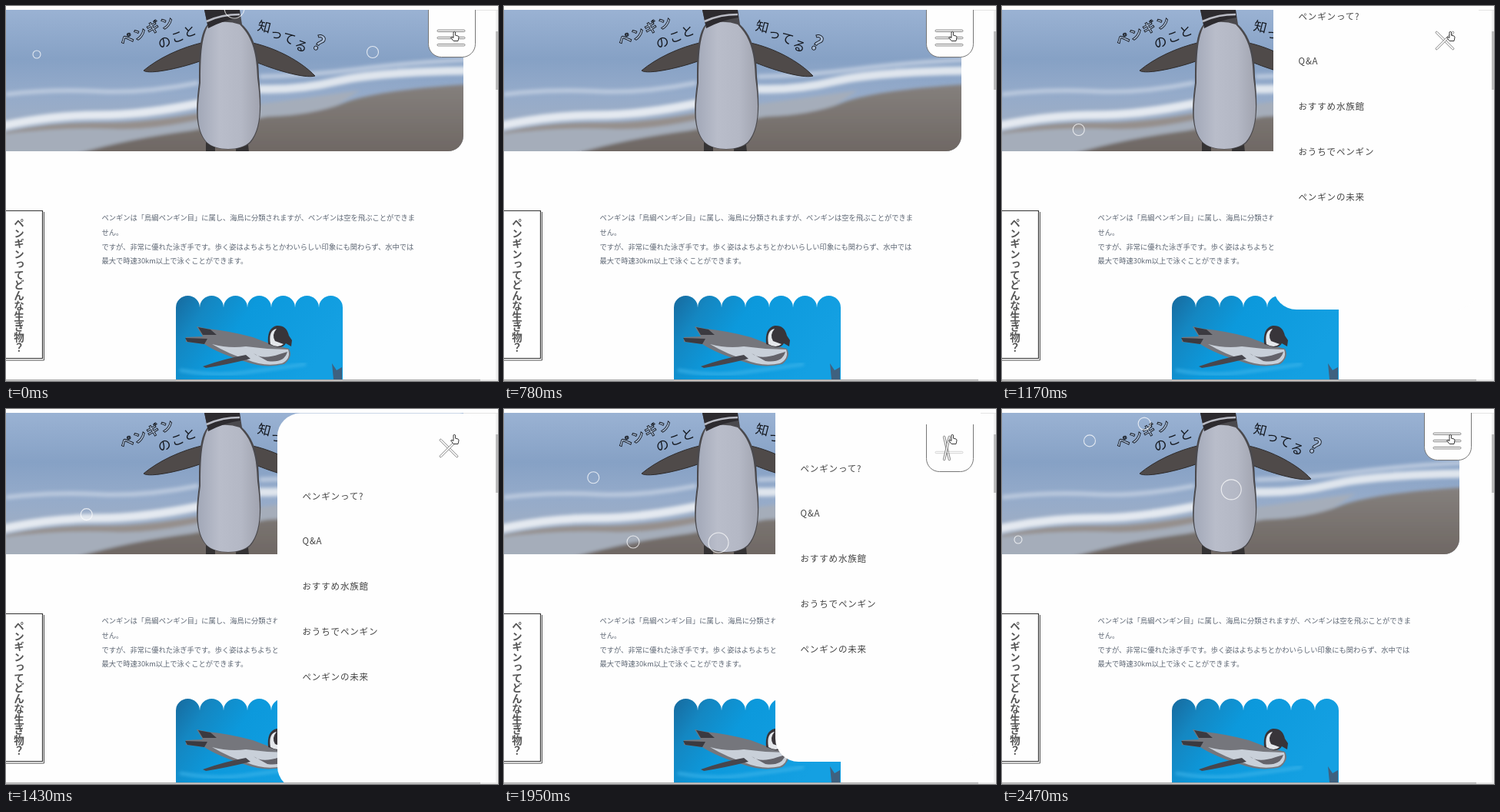
An HTML page for the animation above (2.6 s loop, 640 by 488 pixels).

```html
<!DOCTYPE html>
<html lang="ja">
<head>
<meta charset="utf-8">
<title>ペンギン</title>
<style>
  html, body { margin: 0; width: 100%; height: 100%; overflow: hidden; background: #fefefe; }
  svg { display: block; width: 640px; height: 488px; font-family: "Noto Sans CJK JP", "Noto Sans CJK", "Noto Sans", sans-serif; }
  .title { font-size: 17px; text-anchor: middle; fill: #14181f; }
  .outlined { font-weight: 700; fill: #a9bdd8; stroke: #14181f; stroke-width: .9; }
  .body { font-size: 9.27px; font-weight: 300; fill: #5d6673; }
  .side { font-size: 13.5px; font-weight: 700; fill: #555; writing-mode: vertical-rl; }
  .menu { font-size: 11.5px; font-weight: 300; letter-spacing: .85px; fill: #444; }
  .bar { fill: #fff; stroke: #777; stroke-width: .9; }
  .bubble { fill: none; stroke: #fff; stroke-width: 1.1; opacity: .75; }
</style>
</head>
<body>
<svg id="stage" viewBox="0 0 640 488">
  <defs>
    <clipPath id="heroClip"><path d="M0 5H595V169A20 20 0 0 1 575 189H0Z"/></clipPath>
    <clipPath id="poolClip"><path id="scallops"/></clipPath>
    <clipPath id="pageClip"><rect y="5" width="637" height="481"/></clipPath>
    <linearGradient id="sea" x2="0" y2="1">
      <stop offset="0" stop-color="#9ab2d3"/>
      <stop offset=".35" stop-color="#86a1c5"/>
      <stop offset=".6" stop-color="#95abca"/>
      <stop offset="1" stop-color="#a5b0c0"/>
    </linearGradient>
    <linearGradient id="beach" x2="0" y2="1">
      <stop offset="0" stop-color="#85807d"/>
      <stop offset="1" stop-color="#6e6763"/>
    </linearGradient>
    <linearGradient id="belly" x2="1" y2="0">
      <stop offset="0" stop-color="#a2a8b8"/>
      <stop offset=".35" stop-color="#b9bdca"/>
      <stop offset=".7" stop-color="#b4b8c5"/>
      <stop offset="1" stop-color="#a1a4b0"/>
    </linearGradient>
    <linearGradient id="pool" x2="1" y2=".35">
      <stop offset="0" stop-color="#176a9e"/>
      <stop offset=".2" stop-color="#1487c2"/>
      <stop offset=".45" stop-color="#0c99dc"/>
      <stop offset="1" stop-color="#14a0e2"/>
    </linearGradient>
    <filter id="soft"><feGaussianBlur stdDeviation="2"/></filter>
  </defs>

  <rect width="640" height="488" fill="#fefefe"/>
  <path d="M0 5.5H640" stroke="#e4e4e4"/>

  <g clip-path="url(#heroClip)">
    <rect y="5" width="595" height="184" fill="url(#sea)"/>
    <g filter="url(#soft)">
      <path d="M0 115Q60 108 120 111T250 100M330 92Q400 90 460 82T600 70" stroke="#b9c8dd" stroke-width="6" fill="none"/>
      <path d="M0 164Q60 151 120 152T260 138V192H0Z" fill="#958f8c"/>
      <path d="M-5 167Q70 157 140 160T330 128L460 110 420 136 250 160 120 192H-5Z" fill="#a5adba"/>
      <path d="M-5 156Q60 142 120 142T255 126" stroke="#e4e9f0" stroke-width="11" fill="none"/>
      <path d="M328 108Q380 110 430 98T600 84" stroke="#dfe5ed" stroke-width="11" fill="none"/>
      <path d="M90 193Q160 172 250 161L340 144Q400 142 440 126T600 102V193Z" fill="url(#beach)"/>
    </g>
    <path d="M260 170H272V190H260ZM300 170H314L316 190H299Z" fill="#353334"/>
    <path d="M258 47C227 54 198 68 179 84C186 90 232 80 257 70Z" fill="#4f4a49" stroke="#2d2b2c"/>
    <path d="M321 48C352 55 384 72 402 91C388 95 346 82 323 72Z" fill="#4f4a49" stroke="#2d2b2c"/>
    <path d="M258 5H304L307 24C324 40 329 64 329 92C333 130 333 160 318 178C306 189 273 190 260 177C245 160 247 130 251 100C251 65 251 38 262 24Z" fill="#4a494d"/>
    <path d="M263 25Q284 17 304 24C322 42 326 64 327 94C332 130 332 160 317 177C305 189 273 189 261 177C246 160 249 130 253 100C253 66 254 42 263 25Z" fill="url(#belly)"/>
    <path d="M258 5H304L305 15Q284 18 263 29Z" fill="#2d2b2f"/>
    <path d="M261 20Q280 11 304 11" stroke="#b9bbc4" stroke-width="2.5" fill="none"/>
    <g id="heading"></g>
    <g id="bubbles"></g>
  </g>

  <path d="M49.5 268V461H0" fill="none" stroke="#555"/>
  <path d="M0 266.5H47.5V458.5H0" fill="#fefefe" stroke="#333" stroke-width="1.2"/>
  <text class="side" x="17" y="275.5">ペンギンってどんな生き物？</text>
  <g id="intro" class="body"></g>

  <g clip-path="url(#poolClip)">
    <rect x="221" y="377" width="217" height="109" fill="url(#pool)"/>
    <path d="M226 474Q270 482 310 477T390 466" filter="url(#soft)" fill="none" stroke="#3fb5ea" stroke-width="3"/>
    <path d="M248 417L262 420Q292 423 321 431L342 439L368 446Q374 456 362 466Q336 472 312 463Q276 452 258 440L234 437V431L256 430Z" fill="#75767c"/>
    <path d="M250 418L266 421L274 428L256 428ZM233 432L262 433L258 440L236 437Z" fill="#3b3a40"/>
    <path d="M268 440Q290 446 312 443L340 446L367 447Q371 459 359 465Q336 470 313 460Q290 453 268 440Z" fill="#c9d0d9"/>
    <path d="M256 469Q284 459 312 454L318 459Q286 467 260 471Z" fill="#47464d"/>
    <path d="M322 452Q333 461 356 453L366 450Q362 465 340 462Z" fill="#64636a"/>
    <path d="M341 440Q339 419 352 416Q365 415 368 429L372 435L371 443L364 439Q360 446 350 443Z" fill="#38353a"/>
    <path d="M344 440Q341 422 352 420Q345 428 350 436L361 440Q354 446 344 440Z" fill="#e4e7eb"/>
    <path d="M424 465L430 474 437 470V486H426Z" fill="#3f617f"/>
  </g>

  <g clip-path="url(#pageClip)">
    <g id="panel">
      <rect x="353" y="5.6" width="267" height="489.4" rx="30" fill="#fefefe"/>
      <g id="links" class="menu"></g>
    </g>
    <g id="button">
      <path id="box" d="M549.5 5V49.5A17 17 0 0 0 566.5 66.5H593.5A17 17 0 0 0 610.5 49.5V5" fill="#fefefe" stroke="#777"/>
      <rect class="bar" x="-18" y="-1.2" width="36" height="2.4" rx="1.2"/>
      <rect class="bar" x="-18" y="-1.2" width="36" height="2.4" rx="1.2"/>
      <rect class="bar" x="-18" y="-1.2" width="36" height="2.4" rx="1.2"/>
    </g>
  </g>

  <path d="M582 34Q583.4 32.6 584.6 34V38.2L588 39Q589 39.4 589 41L588 45.5H582.2L578.6 41Q579.4 39.4 582 41.4Z" fill="#fff" stroke="#222" stroke-width=".9"/>
  <rect x="637" y="6" width="3" height="480" fill="#f0f0f0"/>
  <rect x="637" y="33" width="3" height="76" fill="#bcbcbc"/>
  <rect y="486" width="640" height="2" fill="#e6e6e6"/>
  <rect y="486" width="617" height="1.4" fill="#a6a6a6"/>
</svg>
<script>
const STEP = 130, LOOP = 2600;
const $ = id => document.getElementById(id);

function add(parent, tag, attrs, text = "") {
  const el = document.createElementNS("http://www.w3.org/2000/svg", tag);
  for (const k in attrs) el.setAttribute(k, attrs[k]);
  el.textContent = text;
  return parent.appendChild(el);
}

// Scalloped top edge of the pool picture
$("scallops").setAttribute("d", "M221 392.5" + "a15.5 15.5 0 0 1 31 0".repeat(7) + "V486H221Z");

// Curved heading: text, centre x, centre y, turn, outlined, font size
[
  ["ペ", 157, 43, -24, 1], ["ン", 174, 36, -22, 1], ["ギ", 191, 28, -20, 1], ["ン", 209, 22, -20, 1],
  ["の", 206, 47, -24], ["こ", 223, 40, -20], ["と", 239, 33, -18],
  ["知", 336, 27, 14], ["っ", 352, 36, 18], ["て", 368, 42, 20], ["る", 384, 52, 22], ["?", 407, 48, 28, 1, 27]
].forEach(([ch, x, y, turn, outlined, size = 17]) => add($("heading"), "text", {
  class: outlined ? "title outlined" : "title",
  y: size * .365,
  transform: `translate(${x} ${y}) rotate(${turn})`,
  style: `font-size:${size}px`
}, ch));

[
  "ペンギンは「鳥綱ペンギン目」に属し、海鳥に分類されますが、ペンギンは空を飛ぶことができま",
  "せん。",
  "ですが、非常に優れた泳ぎ手です。歩く姿はよちよちとかわいらしい印象にも関わらず、水中では",
  "最大で時速30km以上で泳ぐことができます。"
].forEach((line, i) => add($("intro"), "text", { x: 124.5, y: 279 + i * 18.8 }, line));

["ペンギンって?", "Q&A", "おすすめ水族館", "おうちでペンギン", "ペンギンの未来"]
  .forEach((label, i) => add($("links"), "text", { x: 385.5, y: 117.5 + i * 58.75 }, label));

// Bubbles: radius, time, x and y at that time, speed per ms
const bubbles = [
  [5, 0, 40, 63, 0, -.1],
  [7.5, 0, 477, 60, 0, -.1],
  [13, 0, 297, 3, 0, -.13],
  [7.5, 1170, 0, 161, 0, -.092],
  [8, 1950, 168, 173, .033, -.296],
  [13, 1950, 279, 174, .037, -.133],
  [7, 2080, 548, 52, 0, -.15],
  [5, 2470, 21, 170, 0, -.1]
].map(([r, at, x, y, vx, vy]) => ({ at, x, y, vx, vy, el: add($("bubbles"), "circle", { class: "bubble", r }) }));
const sway = t => 108 + 9.5 * Math.sin((t - 1560) / 370);

// Menu steps: time, panel y, button y, box opacity, bar angle, cross amount, middle bar opacity
const steps = [
  [0, -500, 0, 1, 0, 0, 1],
  [1040, -370, 4, .4, 100, .4, .5],
  [1170, -100, 9, 0, 315, 1, 0],
  [1300, -17, 14, 0, 315, 1, 0],
  [1430, 0, 15, 0, 315, 1, 0],
  [1950, -36, 15, 1, 283, 1, .35],
  [2080, -500, 8, .75, -2, 0, 1],
  [2210, -500, 2, .95, 0, 0, 1],
  [2340, -500, 0, 1, 0, 0, 1]
];
const bars = document.querySelectorAll(".bar");

function draw(t) {
  const [, panelY, buttonY, fill, angle, cross, middle] = steps.findLast(s => s[0] <= t);
  $("panel").setAttribute("transform", `translate(0 ${panelY})`);
  $("button").setAttribute("transform", `translate(0 ${buttonY})`);
  $("box").setAttribute("opacity", fill);
  bars.forEach((bar, i) => {
    const side = i - 1, mix = side ? cross : 0;
    const y = 41.5 + side * 9.2;
    bar.setAttribute("transform",
      `translate(${579 - 3 * mix} ${y + (36 - y) * mix}) rotate(${side * angle}) scale(${1 - .1 * mix} 1)`);
    bar.setAttribute("opacity", side ? 1 : middle);
  });
  for (const b of bubbles) {
    const dt = t - b.at;
    b.el.setAttribute("cx", b.x ? b.x + b.vx * dt : sway(t));
    b.el.setAttribute("cy", b.y + b.vy * dt);
  }
}

const start = performance.now();
function tick() {
  const t = (performance.now() - start) % LOOP;
  draw(Math.floor(t / STEP) * STEP);
  requestAnimationFrame(tick);
}
tick();
</script>
</body>
</html>
```
